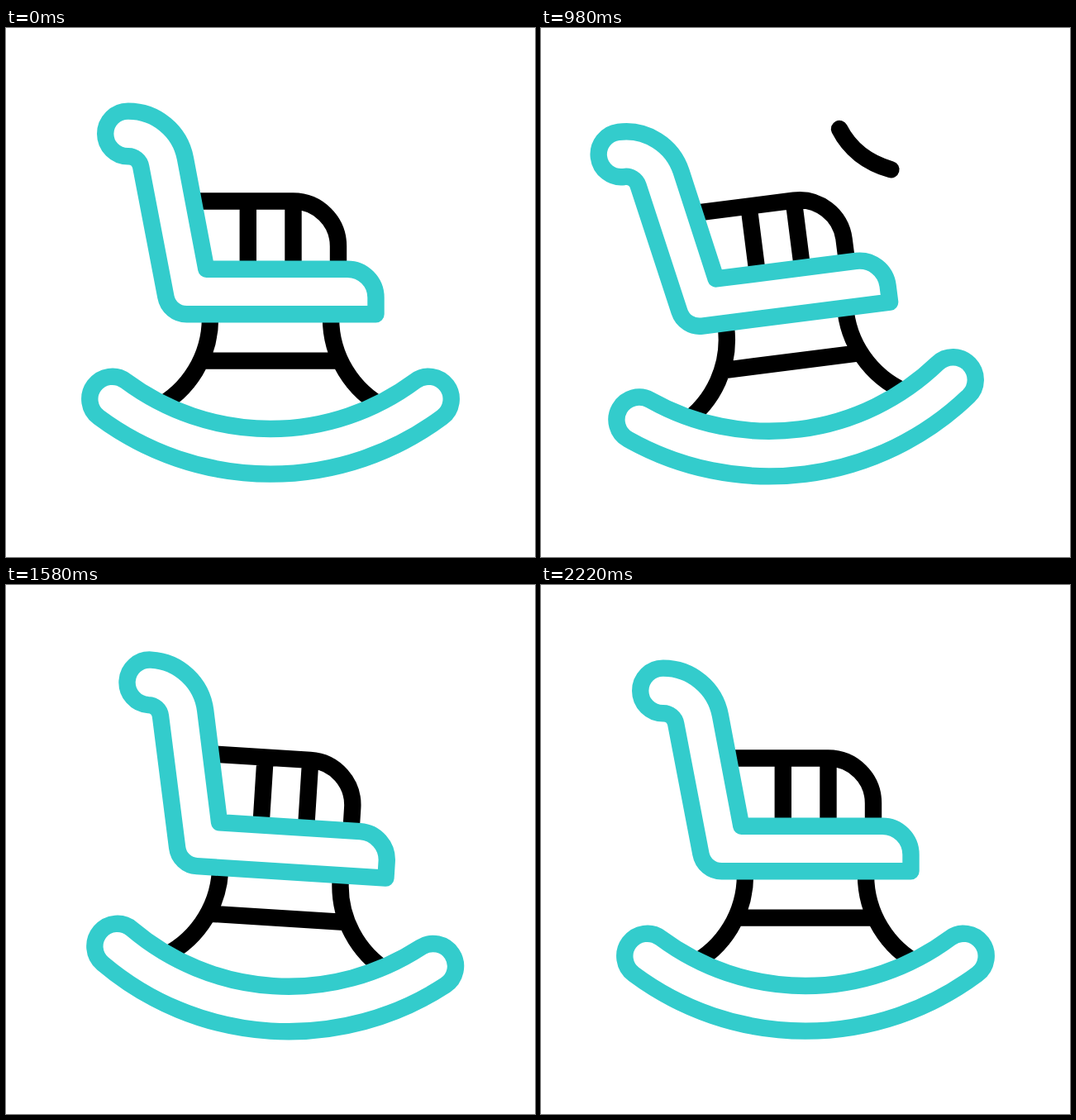
Recreate the animation shown at these times as an HTML page. Size 640 by 640 pixels, loop 2400 ms.

```html
<!DOCTYPE html>
<html lang="en">
<head>
<meta charset="utf-8">
<title>Rocking chair</title>
<style>
  html, body { margin: 0; width: 100%; height: 100%; overflow: hidden; background: #fff; }
  svg { display: block; width: 100vw; height: 100vh; }
  path { stroke-width: 20.4; stroke-linejoin: round; }
  .frame { fill: none; stroke: #000; }
  .body { fill: #fff; stroke: #3cc; }
  #swirl { fill: none; stroke: #000; stroke-linecap: round; }
</style>
</head>
<body>
<svg viewBox="0 0 640 640">
  <g id="chair">
    <!-- armrest, slats, legs, crossbar -->
    <path class="frame" d="M225 209.5H347.5A54.5 54.5 0 0 1 402 264V291M292.8 209.5V291M347.5 209.5V291"/>
    <path class="frame" d="M247 346V351A122.5 122.5 0 0 1 180.4 460M393 346V351A122.5 122.5 0 0 0 459.6 460M236 402.6H404"/>
    <!-- back and seat -->
    <path class="body" d="M147.5 100.6A70.2 70.2 0 0 1 216.9 157.6L242.3 291.7H413A34.5 34.5 0 0 1 447.5 326.2V346.2H218.5A25.5 25.5 0 0 1 193.4 325.3L163.2 167.8A15.5 15.5 0 0 0 147.5 155.2A27.3 27.3 0 0 1 147.5 100.6Z"/>
    <!-- runner -->
    <path class="body" d="M112.3 470.9A348.3 348.3 0 0 0 527.7 470.9A27.3 27.3 0 0 0 495.1 427.1A293.7 293.7 0 0 1 144.9 427.1A27.3 27.3 0 0 0 112.3 470.9Z"/>
  </g>
  <path id="swirl" pathLength="1" d="M485 224C470 213 455 193 452 172C449.3 149 464 128 484 128C499 128 513 140 513 153C513 168 495 177 467 177C425 177 382 163 361 122"/>
</svg>
<script>
  const LOOP = 2400, START = 200, TICK = 20;
  const PIVOT = '320 539.2';
  // [tick, degrees]
  const ROCK = [[0, 0], [30, -12], [60, 10], [80, -5], [100, 0]];
  const SWIRL_TICKS = 35, TAIL_DELAY = 15;

  const chair = document.getElementById('chair');
  const swirl = document.getElementById('swirl');

  const ease = (x) => {
    const c = Math.min(1, Math.max(0, x));
    return c * c * (3 - 2 * c);
  };

  function angleAt(tick) {
    let angle = ROCK[0][1];
    for (let i = 1; i < ROCK.length; i++) {
      const [t0, a0] = ROCK[i - 1], [t1, a1] = ROCK[i];
      angle += (a1 - a0) * ease((tick - t0) / (t1 - t0));
    }
    return angle;
  }

  function draw(time) {
    const tick = Math.max(0, Math.floor((time % LOOP - START) / TICK));
    chair.setAttribute('transform', `rotate(${angleAt(tick)} ${PIVOT})`);

    const head = ease(tick / SWIRL_TICKS);
    const tail = ease((tick - TAIL_DELAY) / SWIRL_TICKS);
    swirl.style.visibility = head > tail ? 'visible' : 'hidden';
    swirl.style.strokeDasharray = `${head - tail} 3`;
    swirl.style.strokeDashoffset = -tail;
  }

  const begin = performance.now();
  function loop() {
    draw(performance.now() - begin);
    requestAnimationFrame(loop);
  }
  loop();
</script>
</body>
</html>
```
